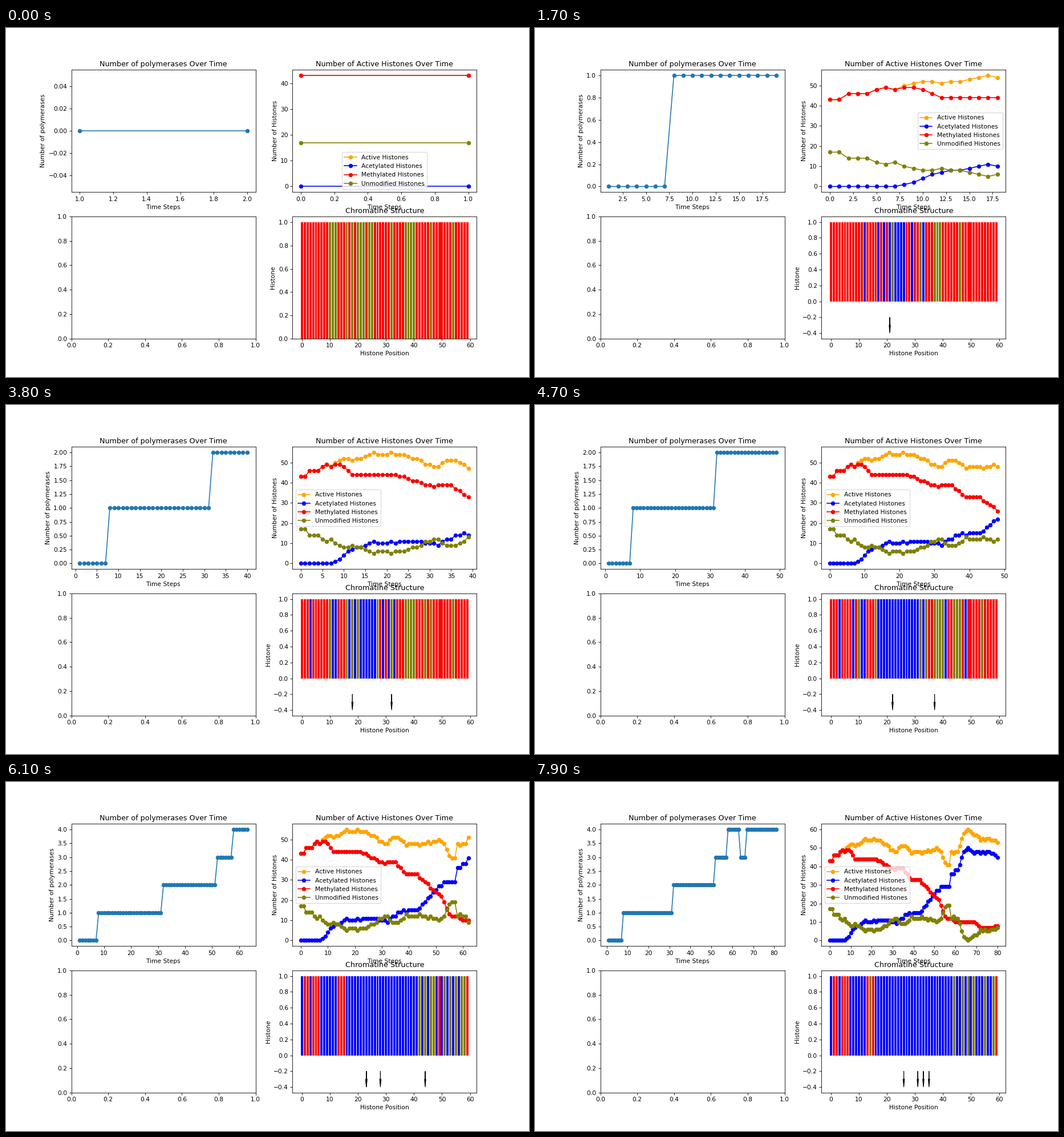
A matplotlib script for the animation above (8 s loop, 917 by 611 pixels).

```python
import matplotlib.pyplot as plt
import numpy as np
from matplotlib.animation import FuncAnimation

SITES = 60
FRAMES = 80

rng = np.random.default_rng(4)
steps = np.arange(FRAMES + 1)
sites = np.arange(SITES)


def counts(*points):
    """Whole numbers that follow the key points, randomly rounded up or down."""
    curve = np.interp(steps, *zip(*points))
    return np.floor(curve + rng.uniform(0.01, 0.99, curve.size)).astype(int)


methylated = counts((0, 43), (1, 43), (2, 46), (4, 46), (5, 48), (9, 49), (12, 44),
                    (22, 44), (31, 38), (35, 39), (39, 33), (43, 33), (48, 26),
                    (52, 22), (55, 13), (61, 10), (69, 10), (72, 7), (78, 7), (80, 8))
acetylated = counts((0, 0), (7, 0), (12, 7), (16, 10), (28, 11), (32, 9), (36, 14),
                    (43, 15), (48, 22), (53, 29), (57, 29), (58, 36), (61, 38),
                    (64, 48), (66, 50), (69, 47), (76, 48), (80, 45))
acetylated = np.minimum(acetylated, SITES - methylated)
unmodified = SITES - methylated - acetylated

# Acetylation spreads outwards from the binding region; a few sites stay methylated.
stable = np.isin(sites, [1, 2, 4, 5, 6, 13, 14, 15, 59])
blue_order = np.argsort(np.abs(sites - 19) / 50 + 0.6 * rng.random(SITES) + stable)
olive_order = np.argsort(rng.random(SITES) + stable)


def chromatin(t):
    row = np.full(SITES, "olive")
    row[:] = "red"
    blue = blue_order[:acetylated[t]]
    free = olive_order[~np.isin(olive_order, blue)]
    row[blue] = "blue"
    row[free[:unmodified[t]]] = "olive"
    return row


# Binding step, release step, first site, sites per step
polymerases = [
    (7, 63, 15.5, 0.52),
    (31, 99, 15.2, 0.40),
    (51, 99, 16.5, 0.58),
    (57, 99, 21.0, 0.42),
    (66, 99, 17.0, 0.64),
]
bound = sum(((steps >= start) & (steps < end)).astype(int)
            for start, end, *_ in polymerases)

fig, axes = plt.subplots(2, 2, figsize=(12.00655, 8), dpi=76.375)
ax_poly, ax_hist, ax_bar = axes[0, 0], axes[0, 1], axes[1, 1]


def label(ax, title, x, y):
    ax.set(title=title, xlabel=x, ylabel=y)


label(ax_poly, "Number of polymerases Over Time", "Time Steps", "Number of polymerases")
label(ax_hist, "Number of Active Histones Over Time", "Time Steps", "Number of Histones")
label(ax_bar, "Chromatine Structure", "Histone Position", "Histone")

curves = [(ax_poly.plot([], [], marker="o")[0], steps + 1, bound)]
for name, color, values in (
    ("Active", "orange", methylated + acetylated),
    ("Acetylated", "blue", acetylated),
    ("Methylated", "red", methylated),
    ("Unmodified", "olive", unmodified),
):
    line, = ax_hist.plot([], [], marker="o", color=color, label=f"{name} Histones")
    curves.append((line, steps, values))
ax_hist.legend(loc="best")

bars = ax_bar.bar(sites, 1)
xlim = ax_bar.get_xlim()
arrows = [ax_bar.arrow(0, -0.2, 0, -0.1, head_width=0.5, head_length=0.1,
                       fc="black", ec="black") for _ in polymerases]
ax_bar.set_xlim(xlim)


def update(frame):
    t = frame + 1
    for line, x, y in curves:
        line.set_data(x[:t + 1], y[:t + 1])
    for ax in (ax_poly, ax_hist):
        ax.relim()
        ax.autoscale_view()

    for bar, color in zip(bars, chromatin(t)):
        bar.set_facecolor(color)
    for arrow, (start, end, site, speed) in zip(arrows, polymerases):
        arrow.set_visible(start < t < end)
        arrow.set_data(x=round(site + speed * (t - start)))
    shown = any(arrow.get_visible() for arrow in arrows)
    ax_bar.set_ylim((-0.47, 1.07) if shown else (0, 1.05))


anim = FuncAnimation(fig, update, frames=FRAMES, interval=100, repeat=True,
                     repeat_delay=0, cache_frame_data=False)
plt.show()
```
